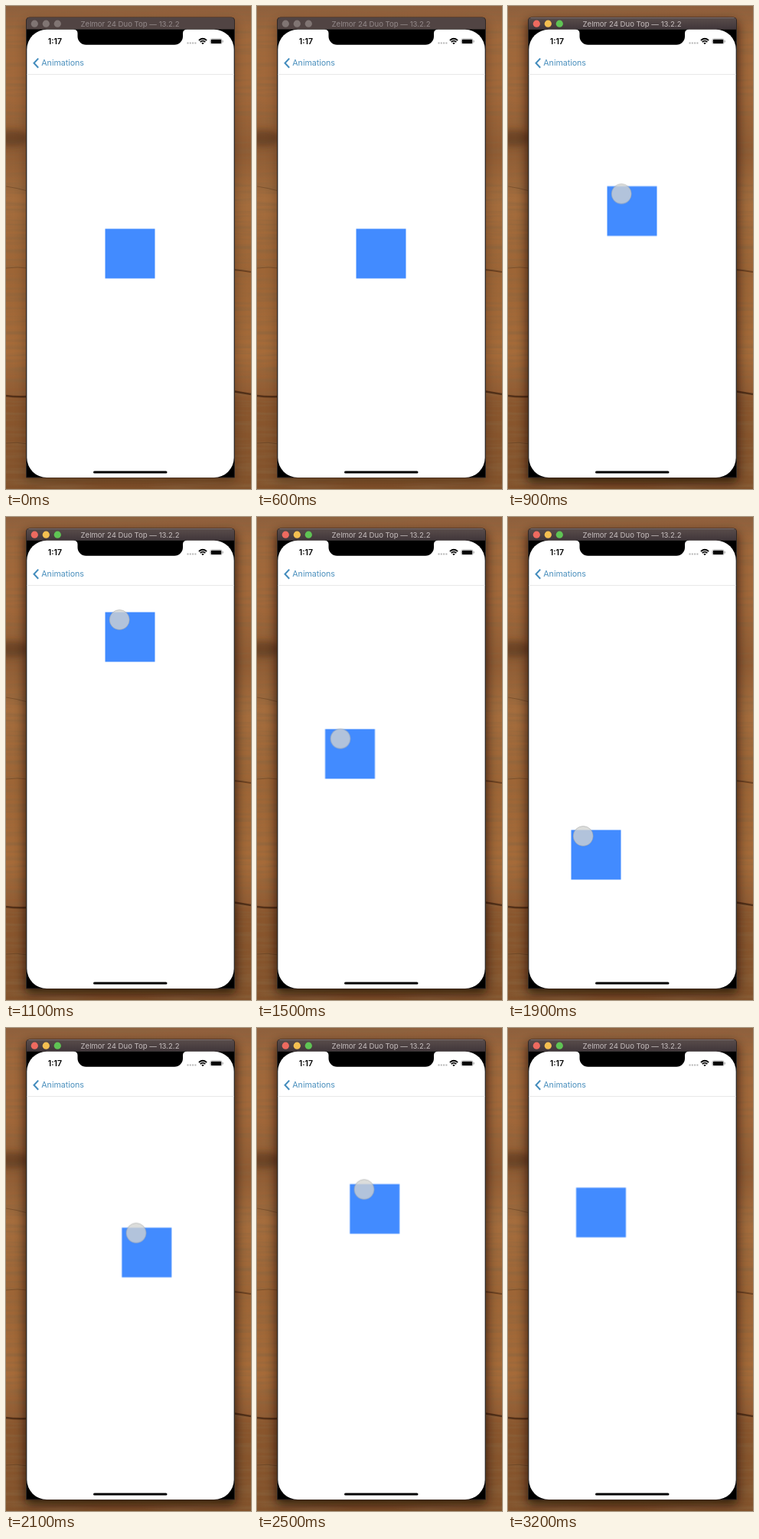
An HTML page that plays this animation: 320x632 px, repeating every 3500 ms.

```html
<!DOCTYPE html>
<html lang="en">
<head>
<meta charset="utf-8">
<title>Drag demo</title>
<style>
  html, body { margin: 0; width: 100%; height: 100%; overflow: hidden; background: #9a6435; }
  svg { display: block; width: 320px; height: 632px; }
  text { font-family: Inter, Roboto, "Liberation Sans", sans-serif; }

  .active, .shade, .touch, .drag { animation: 3500ms step-end infinite; }
  .active { animation-name: focus; }
  .shade { animation-name: deepen; }
  .touch { animation-name: press; }
  .drag { animation-name: drag; }

  @keyframes focus { 0% { opacity: 0; } 19.99%, 100% { opacity: 1; } }
  @keyframes deepen { 0% { opacity: .3; } 19.99%, 100% { opacity: .75; } }

  @keyframes drag {
    0% { transform: translate(0, 0); }
    22.85% { transform: translate(0, 0); animation-timing-function: steps(3); }
    31.42% { transform: translate(0, -167px); animation-timing-function: steps(4); }
    42.85% { transform: translate(-40.5px, -14px); animation-timing-function: steps(4); }
    54.28% { transform: translate(-47px, 118px); animation-timing-function: steps(2); }
    59.99% { transform: translate(21.8px, -30.3px); animation-timing-function: steps(2); }
    65.71% { transform: translate(24px, -92px); animation-timing-function: steps(4); }
    77.13%, 100% { transform: translate(-40.5px, -82.6px); }
  }
  @keyframes press {
    0% { opacity: 0; transform: translate(0, 0); }
    19.99% { opacity: 1; transform: translate(0, 0); }
    31.42% { opacity: 1; transform: translate(0, 0); }
    42.85% { opacity: 1; transform: translate(1.2px, 2.6px); }
    45.71% { opacity: 1; transform: translate(0, 1px); }
    54.28% { opacity: 1; transform: translate(-3px, -2px); }
    57.13% { opacity: 1; transform: translate(0, -3px); }
    77.13%, 100% { opacity: 0; transform: translate(0, 0); }
  }
</style>
</head>
<body>
<svg viewBox="0 0 320 632" xmlns="http://www.w3.org/2000/svg">
  <defs>
    <linearGradient id="wood" x2="0" y2="1">
      <stop offset="0" stop-color="#8f5f3d"/>
      <stop offset=".06" stop-color="#a0683b"/>
      <stop offset=".18" stop-color="#a2683a"/>
      <stop offset=".3" stop-color="#8f5b33"/>
      <stop offset=".4" stop-color="#a56d3d"/>
      <stop offset=".55" stop-color="#9d6536"/>
      <stop offset=".72" stop-color="#a66b39"/>
      <stop offset=".8" stop-color="#925c33"/>
      <stop offset=".82" stop-color="#8a562d"/>
      <stop offset="1" stop-color="#82522b"/>
    </linearGradient>
    <linearGradient id="bar" x2="0" y2="1">
      <stop offset="0" stop-color="#5a4d4b"/>
      <stop offset="1" stop-color="#40363a"/>
    </linearGradient>
    <filter id="grain" x="0" y="0" width="1" height="1">
      <feTurbulence type="fractalNoise" baseFrequency=".01 .16" numOctaves="3" seed="8"/>
      <feColorMatrix values="0 0 0 0 .25  0 0 0 0 .13  0 0 0 0 .05  1.5 0 0 0 -.62"/>
    </filter>
    <filter id="soft" x="-50%" y="-50%" width="200%" height="200%">
      <feGaussianBlur stdDeviation="7"/>
    </filter>
    <filter id="knot" x="-50%" y="-200%" width="200%" height="500%">
      <feGaussianBlur stdDeviation="4"/>
    </filter>
  </defs>

  <!-- Wooden desktop -->
  <rect width="320" height="632" fill="url(#wood)"/>
  <rect width="320" height="632" filter="url(#grain)"/>
  <ellipse cx="8" cy="173" rx="22" ry="11" fill="#4a2a12" opacity=".5" filter="url(#knot)"/>
  <g fill="none" stroke="#3a1f0d">
    <path d="M0 510Q14 512 28 511M296 504Q308 506 320 508" stroke-width="2.500" opacity=".7"/>
    <path d="M297 345Q308 346 320 348" stroke-width="2" opacity=".5"/>
    <path d="M0 236Q14 238 28 242M0 343Q16 341 28 343M0 572Q14 570 28 573" opacity=".3"/>
  </g>

  <!-- Simulator window -->
  <rect class="shade" x="25" y="20" width="275" height="604" rx="6" fill="#1a0c04" opacity=".3" filter="url(#soft)"/>
  <path d="M26.500 617V19a4 4 0 0 1 4-4H294.500a4 4 0 0 1 4 4V617Z" fill="#000" stroke="#302725"/>
  <path d="M27 30.500V19a4 4 0 0 1 4-4H294a4 4 0 0 1 4 4V30.500Z" fill="#514443"/>
  <g fill="#807573">
    <circle cx="37.300" cy="23.200" r="4.600"/>
    <circle cx="52.300" cy="23.200" r="4.600"/>
    <circle cx="67.300" cy="23.200" r="4.600"/>
  </g>
  <text x="162" y="26.800" font-size="9.600" text-anchor="middle" fill="#93898a">Zelmor 24 Duo Top — 13.2.2</text>
  <g class="active">
    <path d="M27 30.500V19a4 4 0 0 1 4-4H294a4 4 0 0 1 4 4V30.500Z" fill="url(#bar)"/>
    <path d="M30 15.500H295" stroke="#85797a" stroke-width=".7"/>
    <circle cx="37.300" cy="23.200" r="4.600" fill="#ee6a5f"/>
    <circle cx="52.300" cy="23.200" r="4.600" fill="#f4bf50"/>
    <circle cx="67.300" cy="23.200" r="4.600" fill="#5fc454"/>
    <text x="162" y="26.800" font-size="9.600" text-anchor="middle" fill="#c6bebe">Zelmor 24 Duo Top — 13.2.2</text>
  </g>

  <!-- Phone screen -->
  <rect x="27.300" y="30.700" width="270.400" height="586.300" rx="26" fill="#fff"/>
  <path d="M88 30.500q5.500 .5 5.500 5v4.300a11 11 0 0 0 11 11H220a11 11 0 0 0 11-11v-4.300q0-4.500 5.500-5Z"/>
  <text x="54.800" y="50" font-size="10.500" font-weight="600">1:17</text>
  <path d="M236.500 48.500h12" stroke="#b5b5b5" stroke-width="1.800" stroke-dasharray="2 1.300"/>
  <g fill="none" stroke="#000" stroke-width="1.700">
    <path d="M251.900 45Q257 40.500 262.100 45"/>
    <path d="M253.700 47.200Q257 44.200 260.300 47.200"/>
  </g>
  <path d="M255.300 48.500Q257 47.200 258.700 48.500L257 50.200Z"/>
  <rect x="266.800" y="42.800" width="15.400" height="7" rx="2" fill="none" stroke="#aaa" stroke-width=".7"/>
  <rect x="267.700" y="43.700" width="13.600" height="5.200" rx="1.200"/>
  <path d="M283.300 45v2.500" stroke="#aaa"/>

  <path d="M42.200 68.600L36.500 74.700L42.200 80.800" fill="none" stroke="#438cbd" stroke-width="2"/>
  <text x="46.300" y="78.400" font-size="10.700" letter-spacing="-.05" fill="#4a8fbd">Animations</text>
  <path d="M27.500 89.500H297.500" stroke="#e8e8e8"/>

  <g class="drag">
    <rect x="129.500" y="291.500" width="65" height="65" fill="#428bff"/>
    <circle class="touch" cx="148.200" cy="301.500" r="13" fill="#d2d3d1" fill-opacity=".78" stroke="#9a9c9c" stroke-opacity=".6" stroke-width=".8"/>
  </g>
  <rect x="114" y="608.600" width="96.500" height="3" rx="1.500"/>
</svg>
</body>
</html>
```
